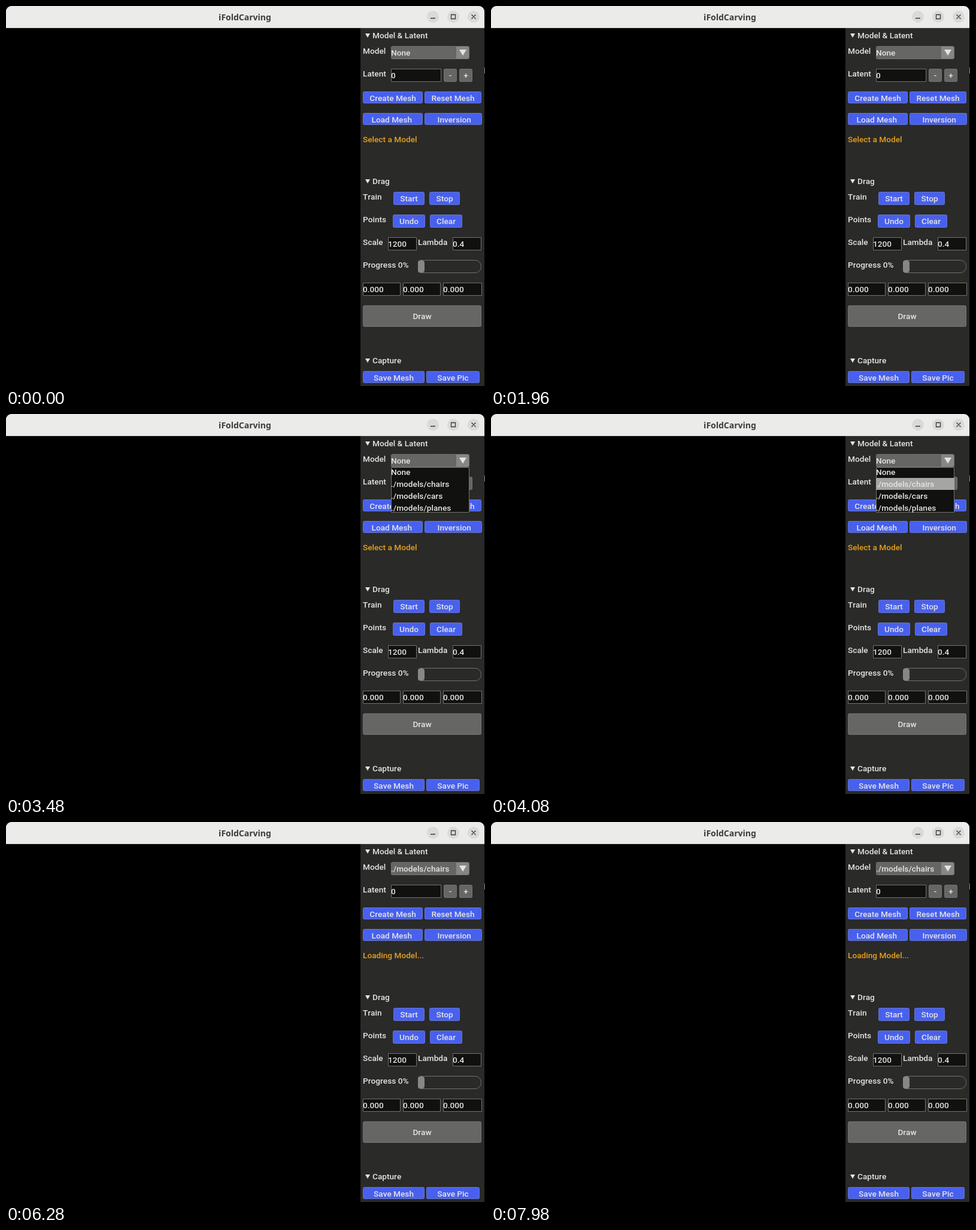
Recreate the animation shown at these times as an HTML page with a canvas. Size 800 px wide and 636 px high, loop 8 s.

```html
<!DOCTYPE html>
<html lang="en">
<head>
<meta charset="utf-8">
<style>
html, body { margin: 0; width: 100%; height: 100%; overflow: hidden; background: #000; }
canvas { display: block; }
</style>
</head>
<body>
<canvas id="stage" width="800" height="636"></canvas>
<script>
const c = document.getElementById('stage').getContext('2d');
const LOOP = 8000;
const INK = '#e4e4e2', PANEL = '#2a2a29', EDGE = '#74736a', FIELD = '#11110f', GREY = '#666665',
      MID = '#878785', LIT = '#a5a5a3', BLUE = '#4860ee', ORANGE = '#e8a01c';

const between = (t, a, b) => t >= a && t < b;

function box(x, y, w, h, fill, edge, r = 0) {
  c.beginPath();
  c.roundRect(x, y, w, h, r);
  c.fillStyle = fill;
  c.fill();
  if (!edge) return;
  c.beginPath();
  c.roundRect(x + .5, y + .5, w - 1, h - 1, r);
  c.strokeStyle = edge;
  c.lineWidth = 1;
  c.stroke();
}

function text(s, x, y, color = INK, align = 'left') {
  c.font = '500 13.65px Roboto, sans-serif';
  c.fontKerning = 'none';
  c.textAlign = align;
  c.fillStyle = color;
  c.fillText(s, x, y);
}

function triangle(x, y, w, h) {
  c.beginPath();
  c.moveTo(x, y);
  c.lineTo(x + w, y);
  c.lineTo(x + w / 2, y + h);
  c.fillStyle = INK;
  c.fill();
}

function header(s, y) {
  triangle(600, y - 8, 8, 7);
  text(s, 612, y);
}

function button(s, x, y, w, h, fill = BLUE, drop = 5) {
  box(x, y, w, h, fill, fill === BLUE ? '#6876c4' : EDGE, 3);
  text(s, x + w / 2, y + h / 2 + drop, INK, 'center');
}

function wideButton(s, x, y, w, hovered) {
  button(s, x, y, w, 20, hovered ? LIT : BLUE, 6);
}

function field(s, x, y, w) {
  box(x, y, w, 22, FIELD, EDGE);
  text(s, x, y + 16);
}

function titleBar() {
  box(0, 0, 799, 37, '#ebebe9', null, [9, 9, 0, 0]);
  c.fillStyle = '#d0d0ce';
  c.fillRect(0, 36, 799, 1);
  c.font = '700 14px Ubuntu, "Noto Sans", sans-serif';
  c.textAlign = 'center';
  c.fillStyle = '#3c3c3c';
  c.fillText('iFoldCarving', 399, 24);
  for (const x of [713, 747, 781]) box(x - 10, 8, 20, 20, '#dadad8', null, 10);
  c.strokeStyle = '#353535';
  c.lineWidth = 1.3;
  c.beginPath();
  c.moveTo(709, 20.5); c.lineTo(717, 20.5);
  c.rect(743.5, 14.5, 7, 7);
  c.moveTo(777.5, 14.5); c.lineTo(784.5, 21.5);
  c.moveTo(784.5, 14.5); c.lineTo(777.5, 21.5);
  c.stroke();
}

function popup(t) {
  box(643, 89, 131, 76, FIELD, EDGE);
  if (t >= 3800) box(643, 107, 131, 20, t < 4800 ? LIT : MID);
  ['None', './models/chairs', './models/cars', './models/planes']
    .forEach((s, i) => text(s, 643, 102 + i * 20));
}

function draw(t) {
  const loaded = t >= 5800;
  c.fillStyle = '#000';
  c.fillRect(0, 0, 800, 636);
  titleBar();
  box(592, 37, 207, 599, PANEL);
  c.fillStyle = '#8a8a88';
  c.fillRect(799, 103, 1, 10);

  header('Model & Latent', 54);
  text('Model', 596, 80);
  box(643, 67, 131, 22, between(t, 2450, 3300) ? MID : GREY, EDGE, 3);
  box(752, 68, 21, 20, MID, null, [0, 3, 3, 0]);
  triangle(757, 73, 12, 10);
  text(loaded ? './models/chairs' : 'None', 643, 83);

  text('Latent', 596, 118);
  field('0', 643, 105, 84);
  button('-', 731, 105, 22, 22, GREY);
  button('+', 757, 105, 22, 22, GREY);

  wideButton('Create Mesh', 596, 143, 100, between(t, 6380, 6560));
  wideButton('Reset Mesh', 699, 143, 95);
  wideButton('Load Mesh ', 596, 179, 100, between(t, 6660, 7480));
  wideButton(' Inversion', 699, 179, 96);
  text(loaded ? 'Loading Model...' : 'Select a Model', 596, 228, ORANGE);

  header('Drag', 298);
  text('Train', 596, 324);
  button('Start', 647, 311, 52, 22);
  button('Stop', 707, 311, 51, 22);
  text('Points', 596, 362);
  button('Undo', 646, 349, 54, 22);
  button('Clear', 708, 349, 54, 22);
  text('Scale', 596, 400);
  field('1200', 638, 387, 48);
  text('Lambda', 688, 400);
  field('0.4', 746, 387, 48);

  text('Progress 0%', 596, 438);
  box(688, 425, 106, 22, PANEL, EDGE, [4, 10, 10, 4]);
  box(688, 426, 11, 20, MID, null, 4);

  field('0.000', 596, 463, 63);
  field('0.000', 663, 463, 63);
  field('0.000', 730, 463, 65);
  button('Draw', 596, 501, 198, 36, GREY);

  header('Capture', 598);
  wideButton('Save Mesh', 596, 611, 103);
  wideButton('Save Pic', 702, 611, 89);

  if (between(t, 3300, 5800)) popup(t);
}

const start = performance.now();
function tick() {
  draw((performance.now() - start) % LOOP);
  requestAnimationFrame(tick);
}
tick();
</script>
</body>
</html>
```
